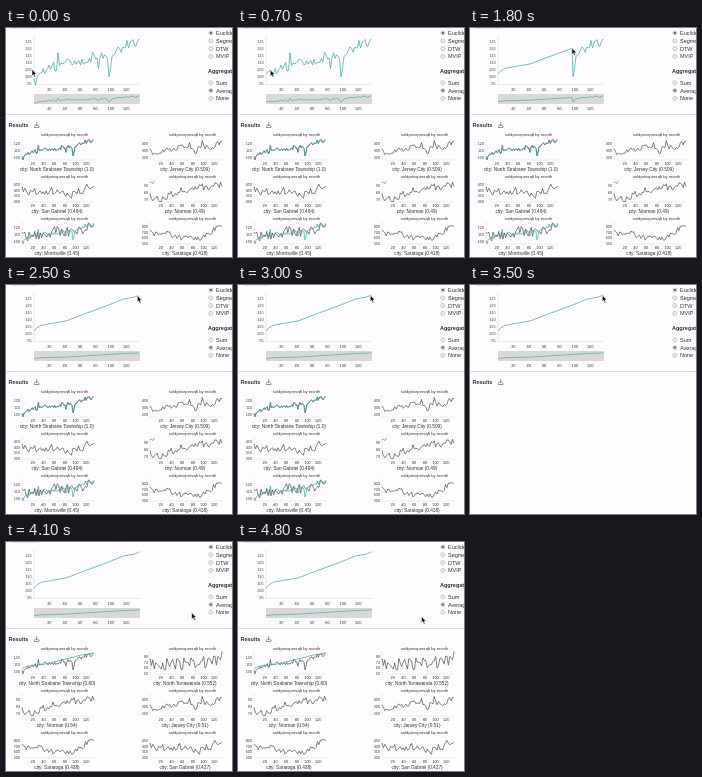
An HTML page that plays this animation: 226 px wide and 229 px high, repeating every 4900 ms.

```html
<!DOCTYPE html>
<html lang="en">
<head>
<meta charset="utf-8">
<title>Sketch query</title>
<style>
html, body { margin: 0; width: 100%; height: 100%; overflow: hidden; background: #fefcfe; }
svg { display: block; width: 226px; height: 229px; font-family: "Liberation Sans", Arial, sans-serif; }
path { fill: none; stroke-linejoin: round; }
</style>
</head>
<body>
<svg id="stage" viewBox="0 0 226 229" xmlns="http://www.w3.org/2000/svg"></svg>
<script>
const NS = 'http://www.w3.org/2000/svg';
const stage = document.getElementById('stage');
const LOOP = 4900, STEP = 100;
const TEAL = '#38a39d', INK = '#333', AXIS = '#dcdcdc';
const LEFT = 28, RIGHT = 133.5;

function add(tag, attrs, parent = stage) {
  const el = document.createElementNS(NS, tag);
  for (const key in attrs) el.setAttribute(key, attrs[key]);
  parent.appendChild(el);
  return el;
}

function text(str, x, y, size, attrs = {}, parent = stage) {
  add('text', { x, y, 'font-size': size, fill: INK, ...attrs }, parent).textContent = str;
}

const middle = { 'text-anchor': 'middle' };
const rightAligned = { 'text-anchor': 'end', fill: '#444' };
const line = (d, color, width, parent) => add('path', { d, stroke: color, 'stroke-width': width }, parent);
const toPath = pts => 'M' + pts.map(p => p.map(v => v.toFixed(2)).join(' ')).join('L');
const mix = (a, b, k) => a + (b - a) * k;
const ease = k => k * k * (3 - 2 * k);
const progress = (t, from, to) => Math.min(1, Math.max(0, (t - from) / (to - from)));

// Piecewise linear value at p through [position, value] pairs
function along(keys, p) {
  const i = Math.max(1, keys.findIndex(key => key[0] >= p));
  const [a, b] = [keys[i - 1], keys[i]];
  return mix(a[1], b[1], progress(p, a[0], b[0]));
}

function noisy(count, seed, amount, place) {
  return Array.from({ length: count }, (_, i) => {
    seed = (seed * 16807) % 2147483647;
    const [x, y] = place(i / (count - 1));
    return [x, y + (seed / 2147483647 - 0.5) * amount];
  });
}

// Monthly series and the hand-drawn curve, in main-chart coordinates
const seriesKeys = [[28, 55], [37, 44], [50.5, 38], [52, 23], [53.5, 33], [74, 34], [91, 27], [92.5, 43],
  [94, 27], [101.5, 28], [103, 53], [104.5, 36], [110, 22], [134, 12]];
const series = noisy(71, 4021, 10, k => {
  const x = mix(28, 133, k);
  return [x, along(seriesKeys, x)];
});

const sketchKeys = [[LEFT, 46], [31, 42.8], [35, 40.3], [48, 38], [60, 36], [75, 30.2], [98, 21.8],
  [118, 13.8], [128, 12.3], [RIGHT, 9.8]];
const sketchY = x => along(sketchKeys, x);

function drawn(tip) {
  if (tip <= LEFT) return series;
  const done = sketchKeys.filter(p => p[0] < tip);
  return [...done, [tip, sketchY(tip)], ...series.filter(p => p[0] > tip)];
}

// Sidebar and page frame
line('M6 .5H32', '#e6e4e6', 1);
line('M0 86.5H226', '#dcdcdc', 1);
text('Results', 2.5, 99, 5.5, { 'font-weight': 700 });
line('M30.7 94V98M29 96.4L30.7 98.1L32.4 96.4M28.4 97.5V99.5H33V97.5', '#555', 0.6);

function radio(label, y, on) {
  add('circle', { cx: 204.8, cy: y, r: 2, fill: '#eee', stroke: '#a8a8a8', 'stroke-width': 0.6 });
  if (on) add('circle', { cx: 204.8, cy: y, r: 1, fill: '#333' });
  text(label, 210, y + 2, 5.5);
}
const radios = (labels, y, chosen) => labels.forEach((label, i) => radio(label, y + i * 7.8, label === chosen));

radios(['Euclidean', 'Segmentation', 'DTW', 'MVIP'], 5, 'Euclidean');
text('Aggregation', 202, 45, 5.5, { 'font-weight': 700 });
radios(['Sum', 'Average', 'None'], 54.8, 'Average');

// Main chart and overview
line('M28 8V56.4H134', AXIS, 0.6);
for (let i = 0; i < 7; i++) text(125 - i * 5, 25.6, 15.2 + i * 7, 3.9, rightAligned);
add('rect', { x: 28, y: 66, width: 106, height: 10, fill: '#d8d8d8' });
for (let v = 20; v <= 120; v += 20) {
  const x = 28 + v * 0.768;
  text(v, x, 63.2, 3.9, middle);
  text(v, x, 81.5, 3.9, middle);
}
const mainLine = line('', TEAL, 0.7);
const miniLine = line('', TEAL, 0.6);

// Small charts: axis runs down from `max`; trend is [share of width, depth below plot top]
const index = { max: 120, by: 10, count: 3 };
const strabane = { ...index };
const morrisville = { ...index, noise: 10, seed: 503, trend: [[0, 16], [0.5, 10], [0.7, 12], [1, 5]] };
const jersey = { max: 400, by: 100, count: 3, noise: 6, seed: 41,
  trend: [[0, 15], [0.3, 13], [0.55, 8], [0.62, 16], [0.73, 6], [0.8, 12], [1, 4]] };
const gabriel = { max: 450, by: 50, count: 4, noise: 8, seed: 73,
  trend: [[0, 12], [0.5, 11], [0.62, 17], [0.8, 13], [1, 4]] };
const norman = { max: 90, by: 10, count: 3, noise: 7, seed: 119, trend: [[0, 18], [0.13, 21], [0.4, 12], [1, 5]] };
const saratoga = { max: 800, by: 100, count: 4, noise: 6, seed: 207,
  trend: [[0, 12], [0.25, 13], [0.5, 18], [0.75, 16], [1, 3]] };
const tonawanda = { max: 80, by: 10, count: 4, noise: 13, seed: 331, trend: [[0, 14], [0.9, 11], [1, 5]] };

const fit = pts => (x, y) => pts.map(p => [x + (p[0] - 28) * 0.68, y + 1 + (p[1] - 8) * 0.44]);
const seriesOver = fit(series);
const sketchOver = fit(sketchKeys);
const stubOver = (x, y) => noisy(4, 9, 3, k => [x + k * 4.5, y + mix(5, 3, k)]);

function cityLine({ trend, seed, noise }, x, y) {
  if (!trend) return seriesOver(x, y);
  return noisy(52, seed, noise, k => [x + k * 72, y + along(trend, k)]);
}

function card(parent, slot, city, label, overlay) {
  const right = slot % 2;
  const x = right ? 144 : 16;
  const y = 109 + Math.floor(slot / 2) * 42;
  const gap = 22 / city.count;
  text('soldpricepersqft by month', x + 42.5, y - 1.5, 4.15, middle, parent);
  line(`M${x} ${y}V${y + 23}H${x + 73}`, AXIS, 0.5, parent);
  for (let i = 0; i < city.count; i++) {
    text(city.max - i * city.by, x - 1.8, y + 4.8 + (i + 0.4) * gap, 3.9, rightAligned, parent);
  }
  for (let v = 20; v <= 120; v += 20) text(v, x + v * 0.535, y + 28, 3.9, middle, parent);
  line(toPath(cityLine(city, x, y)), INK, 0.6, parent);
  if (overlay) line(toPath(overlay(x, y)), TEAL, 0.7, parent);
  text('city: ' + label, x + 35, y + 34.2, 4.75, middle, parent);
}

function results(cards) {
  const group = add('g', {});
  cards.forEach((args, slot) => card(group, slot, ...args));
  return group;
}

const before = results([
  [strabane, 'North Strabane Township (1.0)', seriesOver],
  [jersey, 'Jersey City (0.509)'],
  [gabriel, 'San Gabriel (0.494)'],
  [norman, 'Norman (0.49)', stubOver],
  [morrisville, 'Morrisville (0.45)', seriesOver],
  [saratoga, 'Saratoga (0.418)']
]);
const after = results([
  [strabane, 'North Strabane Township (0.60)', sketchOver],
  [tonawanda, 'North Tonawanda (0.552)'],
  [norman, 'Norman (0.54)'],
  [jersey, 'Jersey City (0.51)'],
  [saratoga, 'Saratoga (0.438)'],
  [gabriel, 'San Gabriel (0.427)']
]);

const cursor = add('path', {
  d: 'M0 0V6.2L1.4 5L2.5 7.4L3.6 6.9L2.5 4.6H4.4Z',
  style: 'fill:#000', stroke: '#fff', 'stroke-width': 0.5
});

// Approach the chart, trace the sketch, then move away to rest
const tipKeys = [[600, LEFT], [1100, 50], [1800, 102], [2400, 131], [3000, RIGHT]];

function pointer(t, tip) {
  if (t < 600) return [mix(26, LEFT, t / 600), mix(41.5, 46, t / 600)];
  const away = ease(progress(t, 3600, 3900));
  const settle = progress(t, 3900, 4300);
  const x = Math.min(tip, 132.3);
  return [mix(x, 188, away) - 4.5 * settle, mix(sketchY(x), 67, away) + 7.5 * settle];
}

function render(time) {
  const t = Math.floor((time % LOOP) / STEP) * STEP;
  const tip = t < 3000 ? along(tipKeys, t) : RIGHT;
  const pts = drawn(tip);
  mainLine.setAttribute('d', toPath(pts));
  miniLine.setAttribute('d', toPath(pts.map(([x, y]) => [x, 67.5 + (y - 8) * 0.165])));
  before.style.display = t < 3100 ? '' : 'none';
  after.style.display = t >= 3600 ? '' : 'none';
  cursor.setAttribute('transform', `translate(${pointer(t, tip)})`);
}

const start = performance.now();
function tick() {
  render(performance.now() - start);
  requestAnimationFrame(tick);
}
tick();
</script>
</body>
</html>
```
